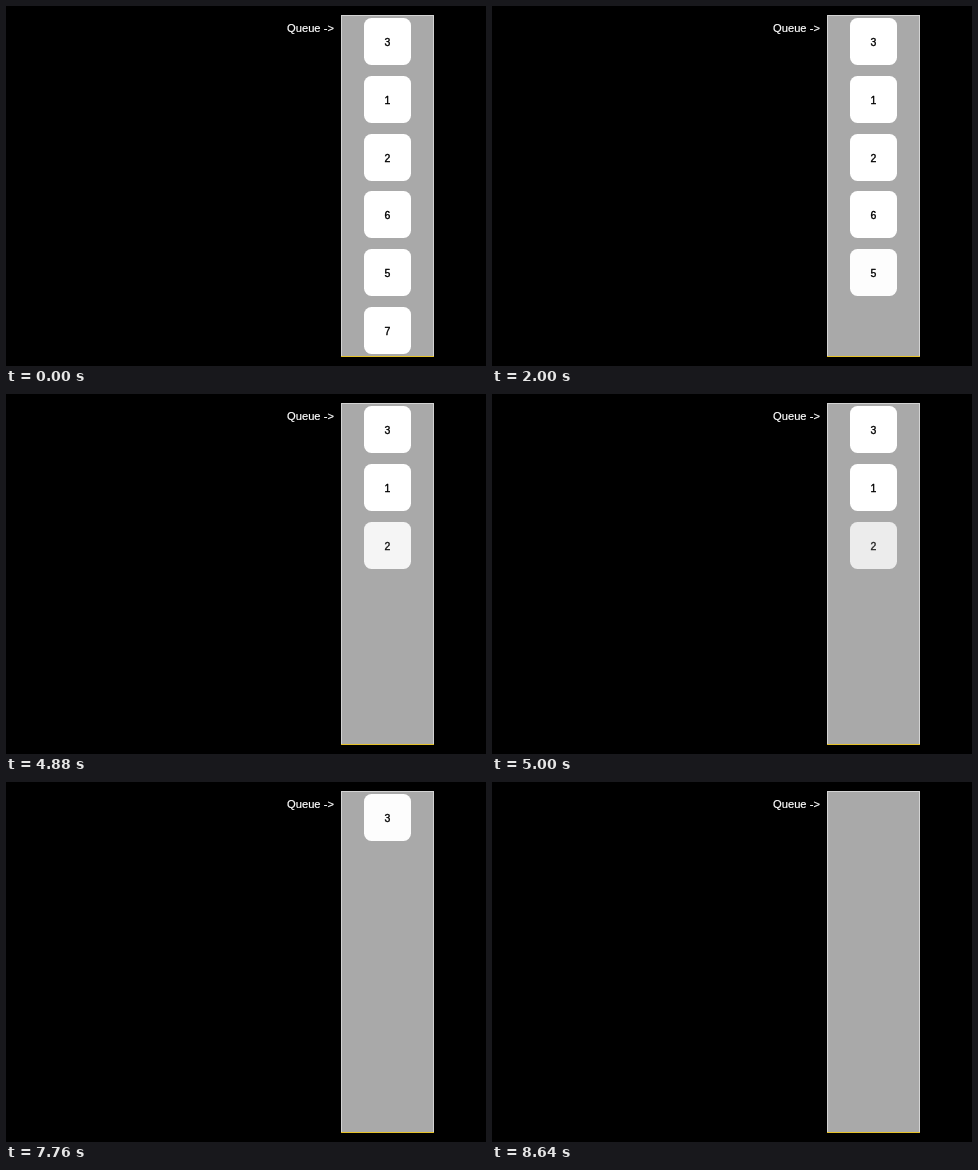
These frames come from a looping animation (480x360 px, 9.16 s). An HTML page with a canvas:

```html
<!DOCTYPE html>
<html lang="en">
<head>
<meta charset="utf-8">
<title>Queue</title>
<style>
  html, body { margin: 0; width: 100%; height: 100%; overflow: hidden; background: #000; }
  canvas { display: block; width: 480px; height: 360px; }
</style>
</head>
<body>
<canvas id="stage"></canvas>
<script>
const canvas = document.getElementById('stage');
const ctx = canvas.getContext('2d');
const ratio = window.devicePixelRatio || 1;
canvas.width = 480 * ratio;
canvas.height = 360 * ratio;

const LOOP = 9160;
const TICK = 40;
const PANEL_GREY = 169;

// Top to bottom; each card fades out in equal steps between start and end.
const cards = [
  { label: '3', y: 12,  start: 7760, end: 8640, steps: 11, first: 0.98, lag: 0.9 },
  { label: '1', y: 70,  start: 6360, end: 7120, steps: 9,  first: 0.8,  lag: 0.9 },
  { label: '2', y: 128, start: 4880, end: 5760, steps: 10, first: 0.88, lag: 0.9 },
  { label: '6', y: 185, start: 3440, end: 4240, steps: 10, first: 0.88, lag: 0.9 },
  { label: '5', y: 243, start: 2000, end: 2880, steps: 11, first: 0.98, lag: 0.5 },
  { label: '7', y: 301, start: 560,  end: 1440, steps: 10, first: 0.88, lag: 0.9 }
];

function opacityAt(card, time) {
  if (time < card.start) return 1;
  if (time >= card.end) return 0;
  const last = card.steps - 1;
  const stepTime = k =>
    Math.floor(k * (card.end - card.start) / last / TICK + card.lag) * TICK;
  let step = 0;
  while (step < last - 1 && time - card.start >= stepTime(step + 1)) step++;
  return card.first * (1 - step / last);
}

function overPanel(value, opacity) {
  const v = Math.round(PANEL_GREY + (value - PANEL_GREY) * opacity);
  return `rgb(${v}, ${v}, ${v})`;
}

function drawText(text, x, y, size, color, align, weight) {
  ctx.font = `${size}px "Liberation Sans", Arial, sans-serif`;
  ctx.textAlign = align;
  ctx.fillStyle = ctx.strokeStyle = color;
  ctx.lineWidth = weight;
  ctx.lineJoin = 'round';
  ctx.fillText(text, x, y);
  ctx.strokeText(text, x, y);
}

function drawPanel() {
  ctx.fillStyle = '#d3d3d3';
  ctx.fillRect(335, 9, 93, 342);
  ctx.fillStyle = overPanel(PANEL_GREY, 1);
  ctx.fillRect(336, 10, 91, 340);
  ctx.fillStyle = '#e6c229';
  ctx.fillRect(335, 350, 93, 1);
}

function drawCard(card, opacity) {
  ctx.fillStyle = overPanel(255, opacity);
  ctx.beginPath();
  ctx.roundRect(358, card.y, 47, 47, 7.5);
  ctx.fill();
  drawText(card.label, 381.5, card.y + 27.5, 10.5, overPanel(0, opacity), 'center', 0.35);
}

function render(time) {
  ctx.setTransform(ratio, 0, 0, ratio, 0, 0);
  ctx.fillStyle = '#000';
  ctx.fillRect(0, 0, 480, 360);
  drawText('Queue ->', 281, 25.5, 11.2, '#fff', 'left', 0.2);
  drawPanel();
  for (const card of cards) {
    const opacity = opacityAt(card, time);
    if (opacity > 0) drawCard(card, opacity);
  }
}

const began = performance.now();
function frame() {
  render((performance.now() - began) % LOOP);
  requestAnimationFrame(frame);
}
frame();
</script>
</body>
</html>
```
